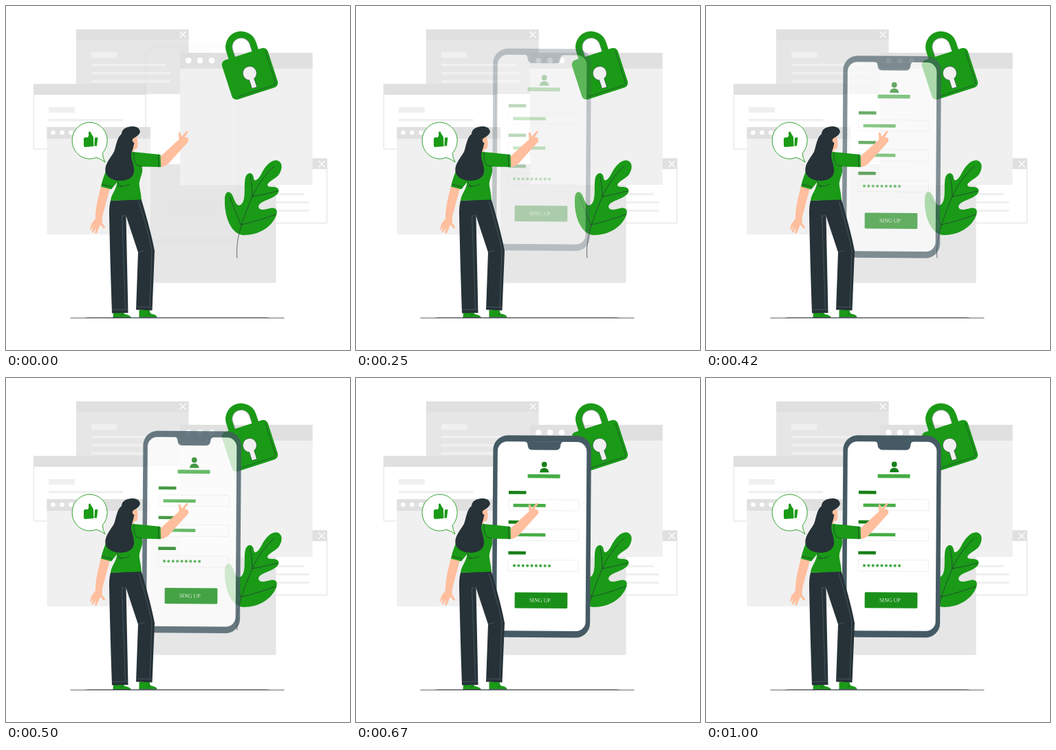
Write an HTML page that moves like this. It is 500 px wide and 500 px high and loops after 1.04 s.

```html
<!DOCTYPE html>
<html lang="en">
<head>
<meta charset="utf-8">
<title>Sign up</title>
<style>
  html, body { margin: 0; width: 100%; height: 100%; overflow: hidden; background: #fff; }
  svg { display: block; width: 100%; height: 100%; }
  .g { fill: #1a9a17; }
  .dk { fill: #263238; }
  .skin { fill: #ffbe9d; }
  .pale { fill: #f0f0f0; }
  .mid { fill: #e6e6e6; }
  .bar { fill: #e0e0e0; }
  .w { fill: #fff; }
  .frame { fill: #fff; stroke: #e0e0e0; }
  .cross { fill: none; stroke: #fff; stroke-width: 1.2; }
  .line { fill: none; stroke: #263238; stroke-width: .7; stroke-linecap: round; }
  .seam { fill: none; stroke: #5d6b72; stroke-width: .6; }
  .label { fill: #178017; }
  .entry { fill: #46ac45; }
  .field { fill: none; stroke: #ebebeb; stroke-width: .8; }
</style>
</head>
<body>
<svg viewBox="0 0 500 500">
  <!-- browser windows -->
  <g>
    <path class="mid" d="M102 34H265.500V128H102z"/>
    <path class="bar" d="M102 34H265.500V49H102z"/>
    <path class="cross" d="M252.500 37l9 9m0-9l-9 9"/>
    <path class="pale" d="M124 67h37.500v8.500H124zM124 84h108v3.500H124zM124 96h115v3.500H124zM124 107.500h115v4H124z"/>
  </g>
  <g>
    <path class="frame" d="M40.300 114H203V208H40.300z"/>
    <path class="bar" d="M40 113.500H203.500V129H40z"/>
    <path class="pale" d="M62 147h38v8H62zM62 164h108v3.500H62z"/>
  </g>
  <g>
    <path class="pale" d="M59.500 176H210V332H59.500z"/>
    <path class="bar" d="M59.500 176H210V193H59.500z"/>
    <g class="w"><circle cx="68.500" cy="184" r="3.300"/><circle cx="81.500" cy="184" r="3.300"/><circle cx="94.500" cy="184" r="3.300"/></g>
  </g>
  <g>
    <path class="frame" d="M380 222H466.500V315.500H380z"/>
    <path class="bar" d="M380 221.500H467V237H380z"/>
    <path class="cross" d="M454.500 225l9 9m0-9l-9 9"/>
    <path class="pale" d="M380 272h53v3H380zM380 284h60.500v3H380zM380 296h60.500v3H380z"/>
  </g>
  <path class="mid" d="M210 230H392.500V402.500H210z"/>
  <path class="pale" d="M253 68H445.500V260H253z"/>
  <path class="bar" d="M253 68H445.500V91H253z"/>
  <g class="w"><circle cx="265.300" cy="79.300" r="4.300"/><circle cx="282" cy="79.300" r="4.300"/><circle cx="299" cy="79.300" r="4.300"/></g>

  <!-- ground -->
  <path class="line" d="M94 453.500H404"/>
  <path class="dk" d="M113 453.600Q116 452.300 122 452.400H376Q382 452.300 385 453.600z" opacity=".7"/>

  <!-- speech bubble -->
  <path d="M140.500 213.500A25.500 26.500 0 1 0 131 220.300Q138 222 144 227Q140 220 140.500 213.500z" fill="#fff" stroke="#1a9a17" stroke-width=".9"/>
  <path class="g" d="M113 193.500Q113 191 115.500 191H119Q121 188 120 184Q120.500 182 122.500 182.500Q124 186 127 190.500L127.500 204L115 205Q113 205 113 202zM129 191.500L133.500 191L132 203.500H128.500z"/>

  <!-- padlock -->
  <g transform="translate(354.500 98.500) rotate(-18)">
    <path d="M-18-28V-41a18 18 0 0 1 36 0V-28" fill="none" stroke="#1a9a17" stroke-width="9.500"/>
    <path class="line" d="M-13-30V-41a13 13 0 0 1 26 0V-30" opacity=".6"/>
    <rect class="g" x="-35" y="-30" width="70" height="60" rx="7"/>
    <path class="line" d="M31.500-24V21Q31.500 26.500 26 26.500H-26" opacity=".75"/>
    <path d="M-3.700 8.500A10 10 0 1 1 3.700 8.500V21.500H-3.700z" fill="#f0f0f0" stroke="#263238" stroke-width=".5"/>
  </g>

  <!-- leaf -->
  <path class="g" d="M346 333C328 333 317 307 318 281C318 268 326 267 330 277C333 285 336 292 341 289C350 283 345 262 348 249C351 241 359 241 360 250C361 257 367 252 371 244C377 232 386 223 394 224.500C403 227 402 238 396 246C390 252 380 256 380 260.500C381 265 390 261 395 265C399 270 394 275 386 279C377 283 367 286 367 292C369 299 379 295 386 293.500C393 293 395 297 393 304C386 322 367 333 346 333z"/>
  <path class="line" d="M336 366C333 341 343 312 358 277C365 261 377 244 390 233M341.500 318Q335 303 325 277M341.500 318Q365 313 392 303M358 277Q358 262 355 247M358 277Q375 274 395 269"/>

  <!-- phone -->
  <g id="phone" opacity="0">
    <g transform="rotate(.4 270 230)">
      <rect x="198.500" y="83.500" width="142.500" height="293.500" rx="21" fill="#455a64"/>
      <rect class="w" x="205" y="92.500" width="129.500" height="275" rx="14"/>
      <path d="M244 92H301Q296.500 93 296.500 97Q296 104.500 290 104.500H255Q249 104.500 248.500 97Q248.500 93 244 92z" fill="#455a64"/>
      <g class="label">
        <circle cx="273" cy="125.500" r="3.900"/>
        <path d="M266.300 137Q267 130.500 273 130.500T279.800 137z"/>
        <path d="M221.500 164.200h25.500v4.600h-25.500zM221.500 207.200h25.500v4.600h-25.500zM221.500 252h25.500v4.600h-25.500z"/>
      </g>
      <path class="entry" d="M249 139.800h47v5.500h-47zM228.300 182.800h47v4.700h-47zM228.300 225.500h47v4.700h-47z"/>
      <g class="field">
        <rect x="221.500" y="176.500" width="102" height="16" rx="1"/>
        <rect x="221.500" y="219.500" width="102" height="17" rx="1"/>
        <rect x="221.500" y="264.500" width="102" height="16.500" rx="1"/>
      </g>
      <path d="M230.300 272.800h52" fill="none" stroke="#46ac45" stroke-width="4.200" stroke-linecap="round" stroke-dasharray="0 6.380"/>
      <rect x="231.300" y="311.500" width="76.700" height="23" rx="1.500" fill="#1a901a"/>
      <text x="268" y="325.500" text-anchor="middle" font-family="'Liberation Serif', serif" font-size="8" fill="#e6f3e6">SING UP</text>
    </g>
  </g>

  <!-- woman -->
  <path class="skin" d="M138 262L151 265L140 306L139.500 315L144.500 322L142 323.500L137 318L131.500 331L129 330L131 322L126.500 329.500L124.500 328.500L127 320L123 326L122 325L124 317L130 309C130 290 135 275 138 262z"/>
  <path class="skin" d="M224 219L251.500 194L250.800 184L253 183.500L255.500 190L262.500 181.500L265 182.500L259.500 190.500Q266.500 190 265 197L237 228Q231 234 224 234z"/>
  <path class="skin" d="M182 192L190 190Q192.500 198 191 205Q190 209 186 208.500L185 214L180 215z"/>
  <path class="g" d="M156 446L170 445L173 448Q181 449.500 181.500 452.500H155.500zM193.500 442H208.500L210 447Q219 448.500 219.500 452H193.500z"/>
  <path class="line" d="M155.500 452.600H181M193.500 452.300H219M170 448l-3 2M209 447l-3 2"/>
  <path class="dk" d="M152 283L196.500 280.500Q210 325 216 356L212.500 442.500L189 441.500L192 358L174.500 305L177.500 446L154 446.500Q151 360 150 300Q150 290 152 283z"/>
  <path class="seam" d="M154.500 441.500L177 441M189.500 437L212.500 438M168.500 304L173.500 440M192 358L201 355.500M193 284Q206 325 212 355L209 437M168 306L175 304"/>
  <path class="g" d="M184 212L224.500 216L225 234L197.500 233.500C201 243 192 252 194 262Q196 272 197 281.500L152 283C153 273 160 268 161.500 256L153 266.500L138 262.500Q141 248 148 234L168 218z"/>
  <path class="line" d="M221.500 216L222 234M139.500 259L154 263M186 213Q185 225 190 231L197.500 233.500M163 262Q172 263 179 259M162 255Q163 260 168 262"/>
  <path class="dk" d="M195 183C194 175 185 174 177 176C169 178 168 184 168 186C161 191 160 204 157 212C151 222 143 230 144.500 241C147 251 158 254 168 254C182 253 187 246 186 237C185 226 180 220 183 212Q185 206 186.500 199Q184 198 183.500 195C184 191 192 191 195 183z"/>
</svg>
<script>
  const LOOP = 1040, LEAD = 44, DROP = 30;
  const phone = document.getElementById('phone');

  const bezier = (a, b, s) => 3 * (1 - s) ** 2 * s * a + 3 * (1 - s) * s * s * b + s ** 3;

  // cubic-bezier(.36, -.01, .5, 1.38), solved by bisection
  function ease(x) {
    let lo = 0, hi = 1;
    for (let i = 0; i < 24; i++) {
      const s = (lo + hi) / 2;
      if (bezier(.36, .5, s) < x) lo = s; else hi = s;
    }
    return bezier(-.01, 1.38, lo);
  }

  function draw() {
    const t = performance.now() % LOOP;
    const p = ease(Math.min(1, (t + LEAD) / LOOP));
    phone.setAttribute('opacity', Math.max(0, Math.min(1, p)));
    phone.setAttribute('transform', `translate(0 ${DROP * (p - 1)})`);
    requestAnimationFrame(draw);
  }
  draw();
</script>
</body>
</html>
```
